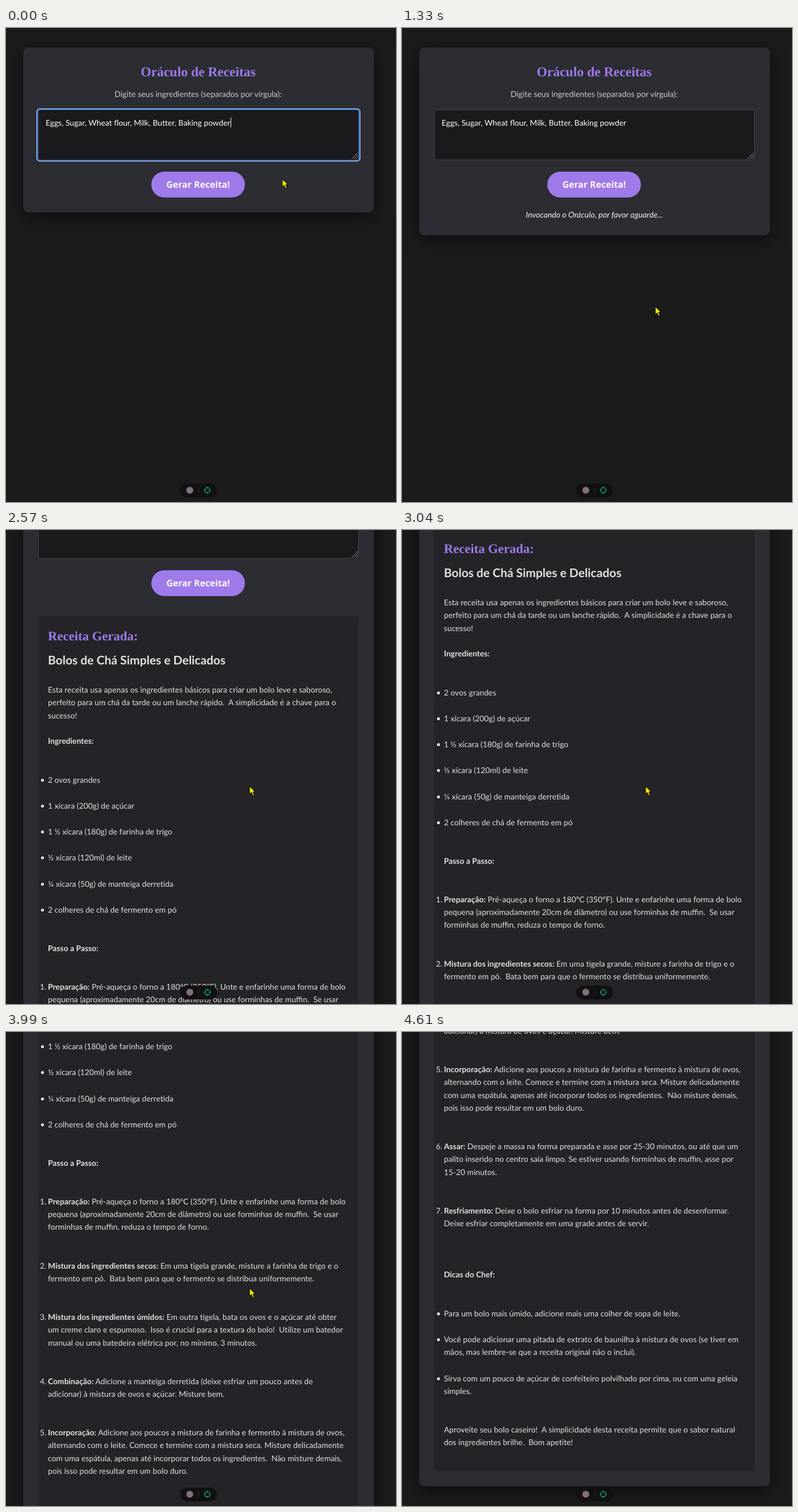
Animation of 679 by 825 pixels, one loop 4880 ms. Source, as an HTML page with a canvas:

```html
<!DOCTYPE html>
<html lang="pt">
<head>
<meta charset="utf-8">
<title>Oráculo de Receitas</title>
<style>
html, body { margin: 0; width: 100%; height: 100%; overflow: hidden; background: #1b1b1c; }
canvas { display: block; }
</style>
</head>
<body>
<canvas id="stage" width="679" height="825"></canvas>
<script>
const ctx = document.getElementById('stage').getContext('2d');
const LOOP = 4880, TICK = 70;
const CARET_OFF = 420, BLUR_AT = 910, RESULT_AT = 1860, CURSOR_GONE = 4480;
const NOTCH = 76, NOTCH_TIME = 117, MAX_SCROLL = 1311.5;
const PURPLE = '#9f7aea', CARD = '#2c2d33', FIELD = '#1a1a1c', BODY = '#e2e2e2';
const TEXT = '13.78px Lato, sans-serif', BOLD = 'bold ' + TEXT;
const LINE = 22.34, LEFT = 73;

const INTRO = `Esta receita usa apenas os ingredientes básicos para criar um bolo leve e saboroso,
perfeito para um chá da tarde ou um lanche rápido.  A simplicidade é a chave para o
sucesso!`;
const INGREDIENTS = ['2 ovos grandes', '1 xícara (200g) de açúcar', '1 ½ xícara (180g) de farinha de trigo',
  '½ xícara (120ml) de leite', '¼ xícara (50g) de manteiga derretida', '2 colheres de chá de fermento em pó'];
const STEPS = [
`Preparação: Pré-aqueça o forno a 180°C (350°F). Unte e enfarinhe uma forma de bolo
pequena (aproximadamente 20cm de diâmetro) ou use forminhas de muffin.  Se usar
forminhas de muffin, reduza o tempo de forno.`,
`Mistura dos ingredientes secos: Em uma tigela grande, misture a farinha de trigo e o
fermento em pó.  Bata bem para que o fermento se distribua uniformemente.`,
`Mistura dos ingredientes úmidos: Em outra tigela, bata os ovos e o açúcar até obter
um creme claro e espumoso.  Isso é crucial para a textura do bolo!  Utilize um batedor
manual ou uma batedeira elétrica por, no mínimo, 3 minutos.`,
`Combinação: Adicione a manteiga derretida (deixe esfriar um pouco antes de
adicionar) à mistura de ovos e açúcar. Misture bem.`,
`Incorporação: Adicione aos poucos a mistura de farinha e fermento à mistura de ovos,
alternando com o leite. Comece e termine com a mistura seca. Misture delicadamente
com uma espátula, apenas até incorporar todos os ingredientes.  Não misture demais,
pois isso pode resultar em um bolo duro.`,
`Assar: Despeje a massa na forma preparada e asse por 25-30 minutos, ou até que um
palito inserido no centro saia limpo. Se estiver usando forminhas de muffin, asse por
15-20 minutos.`,
`Resfriamento: Deixe o bolo esfriar na forma por 10 minutos antes de desenformar.
Deixe esfriar completamente em uma grade antes de servir.`];
const TIPS = ['Para um bolo mais úmido, adicione mais uma colher de sopa de leite.',
`Você pode adicionar uma pitada de extrato de baunilha à mistura de ovos (se tiver em
mãos, mas lembre-se que a receita original não o inclui).`,
`Sirva com um pouco de açúcar de confeiteiro polvilhado por cima, ou com uma geleia
simples.`];
const OUTRO = `Aproveite seu bolo caseiro!  A simplicidade desta receita permite que o sabor natural
dos ingredientes brilhe.  Bom apetite!`;

// The screen refreshes in ticks counted from the start of each burst of motion.
function snap(t) {
  const start = [0, 1860, 2570, 3040, 3380, 3650, 4200].filter(s => s <= t).pop();
  return start + Math.floor((t - start) / TICK) * TICK;
}

// Smooth 0 to 1 ramp.
function ease(t, start, duration) {
  const u = Math.min(1, Math.max(0, (t - start) / duration));
  return u * u * (3 - 2 * u);
}

// Scroll from a run of evenly spaced wheel notches.
function wheel(t, start, count = 1, gap = TICK) {
  let sum = 0;
  for (let i = 0; i < count; i++) sum += NOTCH * ease(t, start + i * gap, NOTCH_TIME);
  return sum;
}

function scrollAt(t) {
  const sum = wheel(t, 1952, 2) + wheel(t, 2522, 2) + wheel(t, 2992) + wheel(t, 3332)
    + wheel(t, 3602, 6, 114) + wheel(t, 4286, 6, 40);
  return Math.min(MAX_SCROLL, sum);
}

function bezier(u, a, b, c, d) {
  const v = 1 - u;
  return v * v * v * a + 3 * v * v * u * b + 3 * v * u * u * c + u * u * u * d;
}

// Swing round to the button, drop below the card, then a small nudge.
function cursorAt(t) {
  const swing = Math.min(1, t / 750), drop = ease(t, 1070, 260), nudge = ease(t, 1860, 140);
  return [bezier(swing, 481, 570, 500, 385) + 56 * drop - 17 * nudge,
    bezier(swing, 263, 350, 360, 282) + 203 * drop - 39 * nudge];
}

function box(x, y, w, h, r, fill, stroke, width = 1) {
  ctx.beginPath();
  ctx.roundRect(x, y, w, h, r);
  if (fill) { ctx.fillStyle = fill; ctx.fill(); }
  if (stroke) { ctx.strokeStyle = stroke; ctx.lineWidth = width; ctx.stroke(); }
}

function disc(x, y, r, fill) {
  ctx.beginPath();
  ctx.arc(x, y, r, 0, Math.PI * 2);
  ctx.fillStyle = fill;
  ctx.fill();
}

function line(x0, y0, x1, y1, color, width = 1) {
  ctx.beginPath();
  ctx.moveTo(x0, y0);
  ctx.lineTo(x1, y1);
  ctx.strokeStyle = color;
  ctx.lineWidth = width;
  ctx.stroke();
}

function text(str, x, y, font, color, align = 'left') {
  const shown = str.replace(/t(?=[ti])/g, 't\u200c'); // no joined "ti" or "tt"
  ctx.font = font;
  ctx.fillStyle = color;
  ctx.textAlign = align;
  ctx.fillText(shown, x, y);
  return ctx.measureText(shown).width;
}

function drawCard(height) {
  ctx.save();
  ctx.shadowColor = 'rgba(0,0,0,0.5)';
  ctx.shadowBlur = 28;
  ctx.shadowOffsetY = 8;
  box(30, 34, 610.5, height, 9, CARD);
  ctx.restore();
}

function drawField(focused, caret) {
  box(56.5, 142.5, 557, 87, 3, FIELD, '#443f52');
  if (focused) {
    box(55, 142, 560, 88.5, 4, null, '#1c5fc4', 2);
    box(53.6, 140.6, 562.8, 91, 5, null, '#c3d8fa', 1.2);
  }
  for (let size = 11.5; size > 3; size -= 4) line(613 - size, 228, 613, 228 - size, '#a0a0a0', 0.9);
  text('Eggs, Sugar, Wheat flour, Milk, Butter, Baking powder', 69, 170, TEXT, '#ffffff');
  if (caret) line(391.5, 156, 391.5, 173, '#ffffff');
}

function drawButton(hover) {
  ctx.save();
  ctx.translate(334.5, 272.5);
  ctx.scale(1 + 0.05 * hover, 1 + 0.05 * hover);
  box(-81.5, -22.5, 163, 45, 22.5, PURPLE);
  text('Gerar Receita!', 0, 5.7, 'bold 15.7px "Open Sans", "Noto Sans", sans-serif', '#ffffff', 'center');
  ctx.restore();
}

function drawRecipe() {
  box(56, 330, 558, 1746.5, 5, '#242428');
  text('Receita Gerada:', LEFT, 372, 'bold 22.5px "Liberation Serif", serif', PURPLE);
  text('Bolos de Chá Simples e Delicados', LEFT, 414, 'bold 20.8px Lato, sans-serif', BODY);

  let y = 463;
  const skip = rows => { y += rows * LINE; };
  const paragraph = (str, lead = '') => str.split('\n').forEach((row, i) => {
    if (i) skip(1);
    const indent = i === 0 && lead ? text(lead, LEFT, Math.round(y), BOLD, BODY) : 0;
    text(row, LEFT + indent, Math.round(y), TEXT, BODY);
  });
  const heading = (str, gap) => { skip(gap); paragraph('', str); skip(1); };
  const bullets = items => items.forEach(item => {
    skip(2);
    y += 0.5;
    disc(63.5, Math.round(y) - 4.5, 2.6, BODY);
    paragraph(item);
  });
  const steps = items => items.forEach((item, i) => {
    skip(i ? 3 : 2);
    text(`${i + 1}.`, 59, Math.round(y), TEXT, BODY);
    const cut = item.indexOf(':') + 1;
    paragraph(item.slice(cut), item.slice(0, cut));
  });

  paragraph(INTRO);
  heading('Ingredientes:', 2);
  bullets(INGREDIENTS);
  heading('Passo a Passo:', 3);
  steps(STEPS);
  heading('Dicas do Chef:', 4);
  bullets(TIPS);
  skip(3);
  paragraph(OUTRO);
}

function drawToolbar() {
  const green = '#10b57e';
  box(303, 793, 64.5, 24, 12, '#111113');
  disc(320, 804.5, 6, '#826f7e');
  line(335.5, 800, 335.5, 809, '#343436');
  ctx.save();
  ctx.translate(350.5, 804.5);
  box(-4.6, -4.6, 9.2, 9.2, 4.6, null, green, 1.2);
  for (let i = 0; i < 4; i++) {
    line(3, 0, 6, 0, green, 1.2);
    ctx.rotate(Math.PI / 2);
  }
  ctx.restore();
}

function drawCursor([x, y]) {
  ctx.save();
  ctx.translate(x, y);
  const arrow = new Path2D('M0 0V13.5L3.2 10.8 5.8 16.5 8.2 15.4 5.8 9.9 10 9.7Z');
  ctx.fillStyle = '#f8ea00';
  ctx.fill(arrow);
  ctx.strokeStyle = '#000000';
  ctx.lineWidth = 1;
  ctx.stroke(arrow);
  ctx.restore();
}

function draw(time) {
  const t = snap(time);
  const focused = t < BLUR_AT, ready = t >= RESULT_AT;
  ctx.fillStyle = '#1b1b1c';
  ctx.fillRect(0, 0, 679, 825);

  ctx.save();
  ctx.translate(0, -Math.round(scrollAt(t)));
  drawCard(ready ? 2068.5 : focused ? 287 : 327);
  text('Oráculo de Receitas', 334.5, 84, 'bold 23.4px "Liberation Serif", serif', PURPLE, 'center');
  text('Digite seus ingredientes (separados por vírgula):', 334.5, 120, '14px Lato, sans-serif', '#cccccc', 'center');
  drawField(focused, t < CARET_OFF);
  drawButton(ease(t, 680, 140) - ease(t, 1120, 210));
  if (ready) drawRecipe();
  else if (!focused) text('Invocando o Oráculo, por favor aguarde...', 335, 330, 'italic 14px Lato, sans-serif', '#f4f4f4', 'center');
  ctx.restore();

  drawToolbar();
  if (t < CURSOR_GONE) drawCursor(cursorAt(t));
}

ctx.textRendering = 'geometricPrecision';
const began = performance.now();
function frame() {
  draw((performance.now() - began) % LOOP);
  requestAnimationFrame(frame);
}
frame();
</script>
</body>
</html>
```
